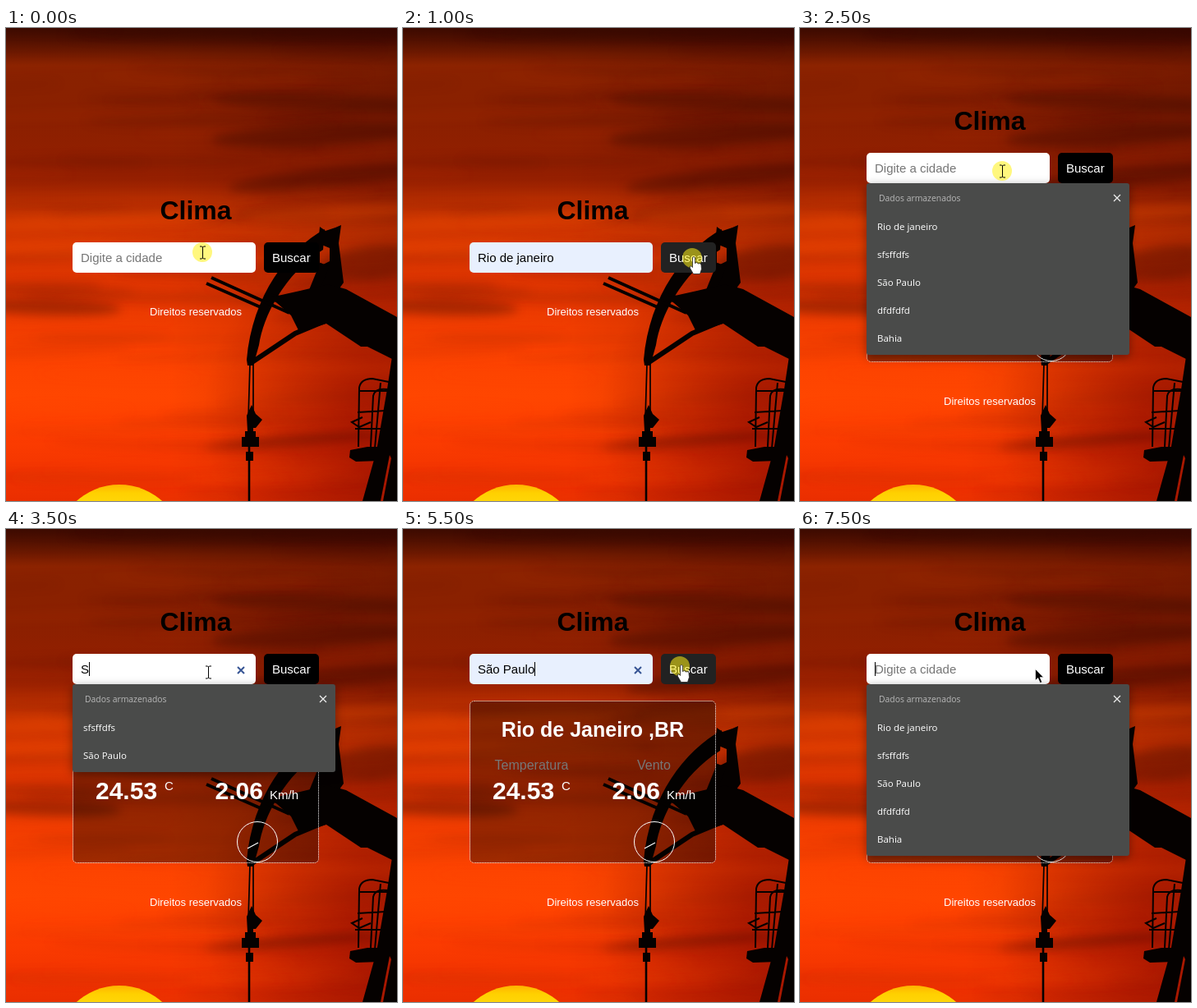
Recreate the animation shown at these times as an HTML page with a canvas. Size 476 by 576 pixels, loop 8000 ms.

```html
<!DOCTYPE html>
<html lang="pt-BR">
<head>
<meta charset="utf-8">
<title>Clima</title>
<style>
  html, body { margin: 0; width: 476px; height: 576px; overflow: hidden; background: #000; }
  canvas, svg { position: absolute; left: 0; top: 0; }
  text { font: 15px "Liberation Sans", Arial, sans-serif; fill: #fff; white-space: pre; }
  .title { font-size: 32px; font-weight: bold; fill: #000; }
  .foot { font-size: 13px; }
  .city { font-size: 25px; font-weight: bold; }
  .num { font-size: 30px; font-weight: bold; }
  .label { font-size: 16px; fill: #777; }
  .mid { text-anchor: middle; }
  #list text { font: 11.5px "Open Sans", "Noto Sans", sans-serif; }
  #list .head { font-size: 10.4px; fill: #b8b8b8; }
  #list { filter: drop-shadow(0 3px 6px rgba(0, 0, 0, .4)); }
</style>
</head>
<body>
<canvas id="sky" width="476" height="576"></canvas>
<svg width="476" height="576" viewBox="0 0 476 576">
  <g id="card">
    <rect x="81.5" y="209.5" width="299" height="197" rx="5" fill="#000" fill-opacity=".37" stroke="#fff" stroke-dasharray="1 1"/>
    <text id="city" class="city mid" x="231" y="253"></text>
    <text class="label mid" x="156.5" y="293">Temperatura</text>
    <text class="label mid" x="305.5" y="293">Vento</text>
    <text id="temp" class="num" x="109" y="329"></text>
    <text x="193" y="318">C</text>
    <text id="wind" class="num" x="254.5" y="329"></text>
    <text x="321" y="329">Km/h</text>
    <circle cx="306" cy="381" r="24.5" fill="none" stroke="#fff"/>
    <path id="needle" stroke="#fff" stroke-width="1.2"/>
  </g>
  <text id="title" class="title mid" x="231">Clima</text>
  <text id="foot" class="foot mid" x="231">Direitos reservados</text>
  <g id="form">
    <rect id="field" x="81" width="223" height="37" rx="5"/>
    <text id="value" x="91" y="24"></text>
    <path id="caret" d="M0 10V27" stroke="#000"/>
    <path id="clear" d="M282 16l8 8m0-8l-8 8" stroke="#365494" stroke-width="2"/>
    <rect id="button" x="314" width="67" height="37" rx="5"/>
    <text x="324" y="24">Buscar</text>
    <g id="list"></g>
  </g>
  <circle id="click" r="12" fill="#fff014" fill-opacity=".55"/>
  <g id="pointer"></g>
</svg>
<script>
const $ = id => document.getElementById(id);
const W = 476, H = 576, STEP = 500;

// ---- sunset and oil pump ----
function drawSky() {
  const c = $('sky').getContext('2d');
  let seed = 11;
  const rnd = () => (seed = seed * 16807 % 2147483647) / 2147483647;
  const ramp = (g, stops) => {
    stops.forEach(([p, col]) => g.addColorStop(p, col));
    return g;
  };
  const fill = style => { c.fillStyle = style; c.fillRect(0, 0, W, H); };

  fill(ramp(c.createLinearGradient(0, 0, 0, H), [
    [0, '#3c0b00'], [.03, '#561200'], [.08, '#8a2200'], [.18, '#8a2000'],
    [.32, '#951f00'], [.39, '#c63400'], [.46, '#d63600'], [.55, '#e03500'],
    [.68, '#fb4200'], [.78, '#ff4600'], [.87, '#fc3c00'], [1, '#ea2e00']]));
  fill(ramp(c.createLinearGradient(200, 0, W, 0),
    [[0, 'rgba(50,0,0,0)'], [1, 'rgba(50,0,0,.25)']]));
  fill(ramp(c.createRadialGradient(450, 470, 30, 450, 470, 210),
    [[0, 'rgba(130,0,0,.5)'], [1, 'rgba(130,0,0,0)']]));

  const streak = (x, y, rx, ry, tilt, col) => {
    c.fillStyle = col;
    c.beginPath();
    c.ellipse(x, y, rx, ry, tilt, 0, 7);
    c.fill();
  };
  c.filter = 'blur(6px)';
  for (let i = 0; i < 85; i++) {
    const y = rnd() * H, dark = rnd() < .5;
    streak(rnd() * W, y, 50 + rnd() * 130, 2 + rnd() * 6, -.06 + rnd() * .1,
      dark ? `rgba(70,8,0,${y < 370 ? .16 : .07})` : `rgba(255,80,0,${.05 + y / H * .07})`);
  }
  [[330, 8, 260, 9, 0], [400, 92, 150, 10, .03], [380, 130, 130, 14, -.05],
   [400, 182, 130, 12, -.1], [50, 340, 90, 10, .03], [350, 502, 110, 5, -.08],
   [450, 285, 70, 20, -.1]]
    .forEach(([x, y, rx, ry, t]) => streak(x, y, rx, ry, t, 'rgba(45,5,0,.33)'));
  [[110, 235, 150, 9, -.05], [400, 226, 110, 9, -.06], [120, 268, 170, 10, 0]]
    .forEach(([x, y, rx, ry, t]) => streak(x, y, rx, ry, t, 'rgba(255,85,0,.28)'));
  c.filter = 'none';

  c.fillStyle = ramp(c.createLinearGradient(0, 556, 0, 590), [[0, '#ffb400'], [.3, '#ffd000'], [1, '#ffdc10']]);
  c.beginPath();
  c.arc(138, 634, 78, 0, 7);
  c.fill();

  const shape = d => { c.fillStyle = '#050100'; c.fill(new Path2D(d), 'evenodd'); };
  const line = (w, d) => { c.strokeStyle = '#050100'; c.lineWidth = w; c.stroke(new Path2D(d)); };
  // curved head
  shape('M388 245C343 270 300 325 293 404L294 411L301 411L308 386C313 352 338 300 386 270Z');
  shape('M382 242L389 247L401 243L408 240L405 262L411 310L406 317L392 313L384 330L365 330L381 292V252ZM382 263L394 268V284L382 290Z');
  // struts and walking beam
  line(6, 'M298 408L352 372L400 352');
  line(9, 'M316 326L362 338');
  line(12, 'M388 288L362 352');
  line(4, 'M250 304L345 347M244 311L310 340');
  shape('M322 328L358 320L392 312L414 318L476 352V406L440 388L432 388L390 360L357 370L347 350Z');
  // polished rod
  line(1.7, 'M297 408L295 476M301 408V476');
  shape('M293 472L299 459L304 470L312 477L304 487H301V491H304V498H308V510H287V498H291V491H294Z');
  shape('M292 516H301V527H292Z');
  line(2.6, 'M296 505V576');
  // tower, ladder and platform
  shape('M470 400H476V576H434L451 515L464 440ZM467 520L456 576H459L469 524Z');
  shape('M419 514L440 510H456V527L426 528L418 523Z');
  line(2, 'M429 510L430 438Q432 427 446 427L466 431M444 510L447 448Q449 438 464 440M430 442H464M428 468L462 466M425 488H460M456 432L449 512M434 474L421 480L430 486L444 480');
}

// ---- interface states ----
const ALL = ['Rio de janeiro', 'sfsffdfs', 'São Paulo', 'dfdfdfd', 'Bahia'];
const SOME = ALL.slice(1, 3);
const RIO = { city: 'Rio de Janeiro ,BR', temp: '24.53', wind: '2.06', needle: 'M294 389L307 382' };
const SP = { city: 'São Paulo ,BR', temp: '21.35', wind: '4.12', needle: 'M306 382L303 397' };

const steps = [
  { at: ['beam', 239, 273], click: 1 },
  { at: ['arrow', 190, 352], text: ALL[0], auto: 1, list: ALL, row: 0 },
  { at: ['hand', 352, 280], click: 1, text: ALL[0], auto: 1, hover: 1 },
  { at: ['arrow', 360, 282], text: ALL[0], auto: 1, data: RIO },
  { at: ['beam', 246, 174], click: 1, data: RIO },
  { at: ['beam', 246, 174], click: 1, data: RIO, list: ALL },
  { at: ['beam', 246, 174], data: RIO, list: ALL, caret: 91.5 },
  { at: ['beam', 246, 174], data: RIO, list: SOME, text: 'S', caret: 101.5, clear: 1 },
  { at: ['beam', 240, 184], data: RIO, list: SOME, text: 'Sa', caret: 109.5, clear: 1 },
  { at: ['beam', 200, 188], data: RIO, text: 'Sa', caret: 109.5, clear: 1 },
  { at: ['arrow', 140, 277], data: RIO, list: SOME, row: 1, text: ALL[2], auto: 1, clear: 1 },
  { at: ['hand', 337, 167], click: 1, data: RIO, text: ALL[2], auto: 1, caret: 160.5, clear: 1, hover: 1 },
  { at: ['arrow', 283, 169], data: SP, text: ALL[2], auto: 1, caret: 160.5, clear: 1 },
  { at: ['arrow', 283, 169], click: 1, data: SP, caret: 91.5 },
  { at: ['arrow', 282, 161], data: SP, list: ALL, caret: 91.5 },
  { at: ['arrow', 286, 170], data: SP, list: ALL, caret: 91.5 }
];

const beam = 'M-3.5 -7.5H-1L0 -6.5L1 -7.5H3.5M0 -6.5V6.5M-3.5 7.5H-1L0 6.5L1 7.5H3.5';
const pointers = {
  beam: click => `<path d="${beam}" fill="none" stroke="#fff" stroke-width="${click ? 0 : 3}"/>
    <path d="${beam}" fill="none" stroke="#000"/>`,
  arrow: () => '<path d="M0 0V14L3.2 11L5.8 17L8.2 16L5.7 10.2H10Z" fill="#000" stroke="#fff" stroke-width=".7"/>',
  hand: () => `<path d="M0 -1Q1.5 -3 3 -1V6L5 5L7 6.5L9 6L10.5 8L11 13L9 19H1L-3 12Q-4 8 -1 10L0 11Z"
    fill="#fff" stroke="#222" stroke-width=".8"/>`
};

function listMarkup(items, row) {
  const lines = items.map((name, i) =>
    (i === row ? `<rect x="81" y="${73 + 34 * i}" width="320" height="34" fill="#606060"/>` : '') +
    `<text x="94" y="${94 + 34 * i}">${name}</text>`);
  return `<rect x="81" y="37" width="320" height="${39 + 34 * items.length}" rx="3" fill="#4a4b4a"/>
    <text class="head" x="96" y="59">Dados armazenados</text>
    <path d="M382 51l8 8m0-8l-8 8" stroke="#eee" stroke-width="1.2"/>${lines.join('')}`;
}

const show = (id, on) => $(id).setAttribute('visibility', on ? 'visible' : 'hidden');
const set = (id, key, value) => $(id).setAttribute(key, value);

function render(s) {
  const [kind, x, y] = s.at, text = s.text || '';
  const top = s.data ? 152 : 261;
  set('form', 'transform', `translate(0 ${top})`);
  set('title', 'y', top - 28);
  set('foot', 'y', s.data ? 459 : 350);

  show('card', s.data);
  if (s.data) {
    for (const id of ['city', 'temp', 'wind']) $(id).textContent = s.data[id];
    set('needle', 'd', s.data.needle);
  }
  set('field', 'fill', s.auto ? '#e8f0fe' : '#fff');
  $('value').textContent = text || 'Digite a cidade';
  $('value').style.fill = text ? '#000' : '#757575';
  show('caret', s.caret);
  set('caret', 'transform', `translate(${s.caret || 0} 0)`);
  show('clear', s.clear);
  set('button', 'fill', s.hover ? '#222' : '#000');
  $('list').innerHTML = s.list ? listMarkup(s.list, s.row) : '';

  show('click', s.click);
  set('click', 'cx', x);
  set('click', 'cy', y);
  set('pointer', 'transform', `translate(${x + .5} ${y + .5})`);
  $('pointer').innerHTML = pointers[kind](s.click);
}

let last = -1;
function tick() {
  const i = Math.floor(performance.now() / STEP) % steps.length;
  if (i !== last) render(steps[last = i]);
  requestAnimationFrame(tick);
}

drawSky();
tick();
</script>
</body>
</html>
```
